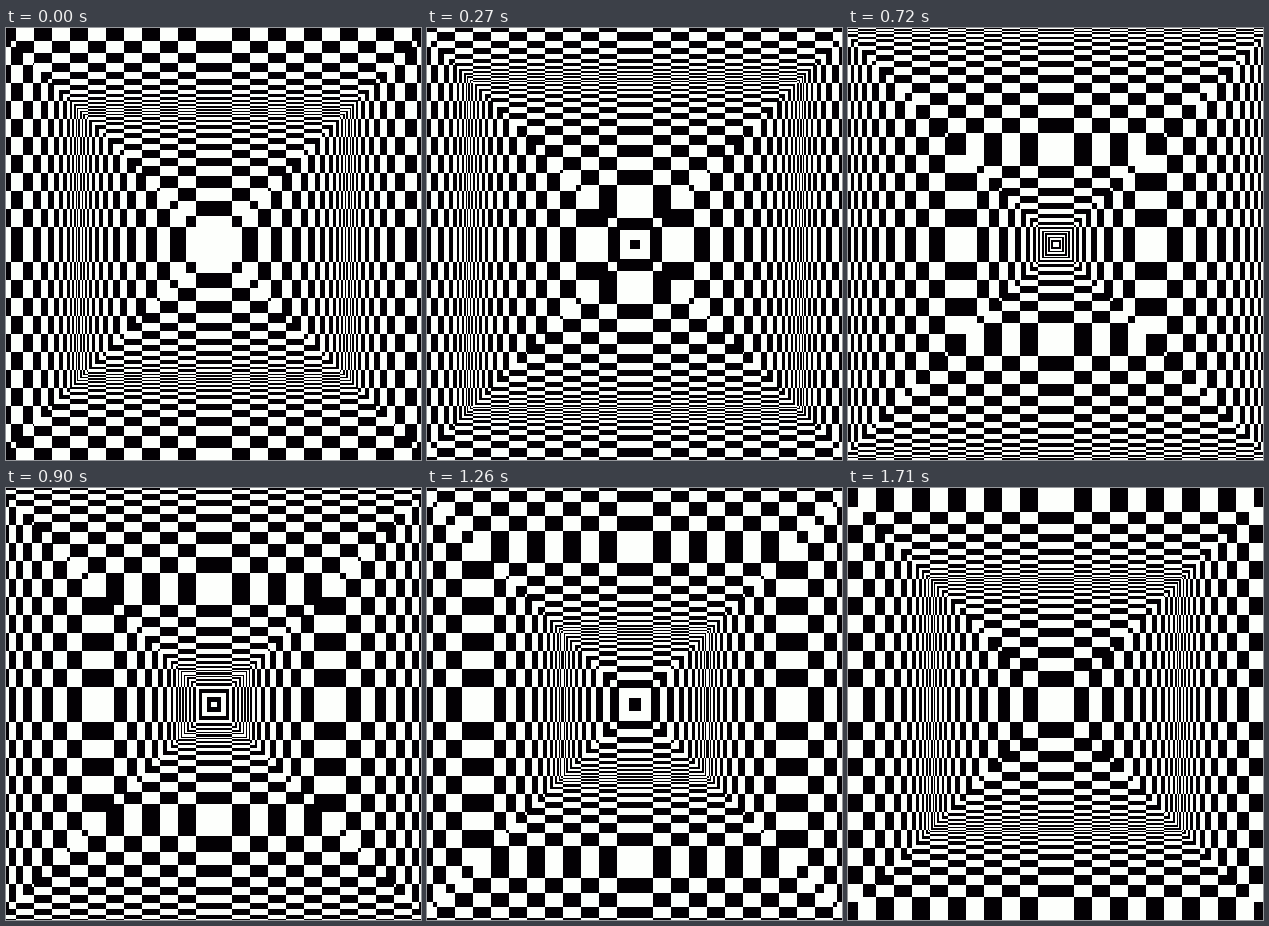
Animation, 415 px wide and 432 px high, one loop 1.8 s. Source, as an HTML page with a canvas:

```html
<!DOCTYPE html>
<html lang="en">
<head>
<meta charset="utf-8">
<title>Pulsing checkered squares</title>
<style>
  html, body { margin: 0; width: 100%; height: 100%; overflow: hidden; background: #fdfffc; }
  canvas { display: block; width: 415px; height: 432px; }
</style>
</head>
<body>
<canvas id="stage" width="415" height="432"></canvas>
<script>
const WIDTH = 415, HEIGHT = 432;
const CELL = 18;
const STEP_MS = 90, STEPS = 20;
const WAVELENGTH = WIDTH / 2;
const FOLD = 0.6;                // where the rings are thinnest, as a share of the wave
const RINGS_OUT = 20, RINGS_IN = 16;
const SQUEEZE = 0.055;           // ring width at the fold relative to the crest
const INK = 0xff040003, PAPER = 0xfffcfffd; // ABGR

const ctx = document.getElementById('stage').getContext('2d');
const image = ctx.createImageData(WIDTH, HEIGHT);
const pixels = new Uint32Array(image.data.buffer);

// Share of rings passed on the way from crest (0) to fold (1); widths shrink geometrically.
const squeeze = v => Math.log(1 - v * (1 - SQUEEZE)) / Math.log(SQUEEZE);

function ringAt(radius, time) {
  const u = (radius / WAVELENGTH - time + 2) % 1;
  return Math.floor(u < FOLD
    ? RINGS_OUT * squeeze(u / FOLD)
    : RINGS_IN * squeeze((1 - u) / (1 - FOLD)));
}

function draw(step) {
  const time = (step + 1) / STEPS;
  // Radii fall on whole and half pixels, so one entry per half pixel is enough.
  const rings = Array.from({ length: HEIGHT + 1 }, (_, i) => ringAt(i / 2, time));

  for (let y = 0; y < HEIGHT; y++) {
    const dy = Math.abs(y - HEIGHT / 2);
    for (let x = 0; x < WIDTH; x++) {
      const dx = Math.abs(x - WIDTH / 2);
      const column = Math.floor(Math.min(dx, dy) / CELL);
      const odd = (column + rings[2 * Math.max(dx, dy)]) % 2;
      pixels[y * WIDTH + x] = odd ? INK : PAPER;
    }
  }
  ctx.putImageData(image, 0, 0);
}

const startTime = performance.now();
let shown = -1;

function tick() {
  const elapsed = performance.now() - startTime;
  const step = Math.floor(elapsed / STEP_MS) % STEPS;
  if (step !== shown) draw(shown = step);
  requestAnimationFrame(tick);
}
tick();
</script>
</body>
</html>
```
